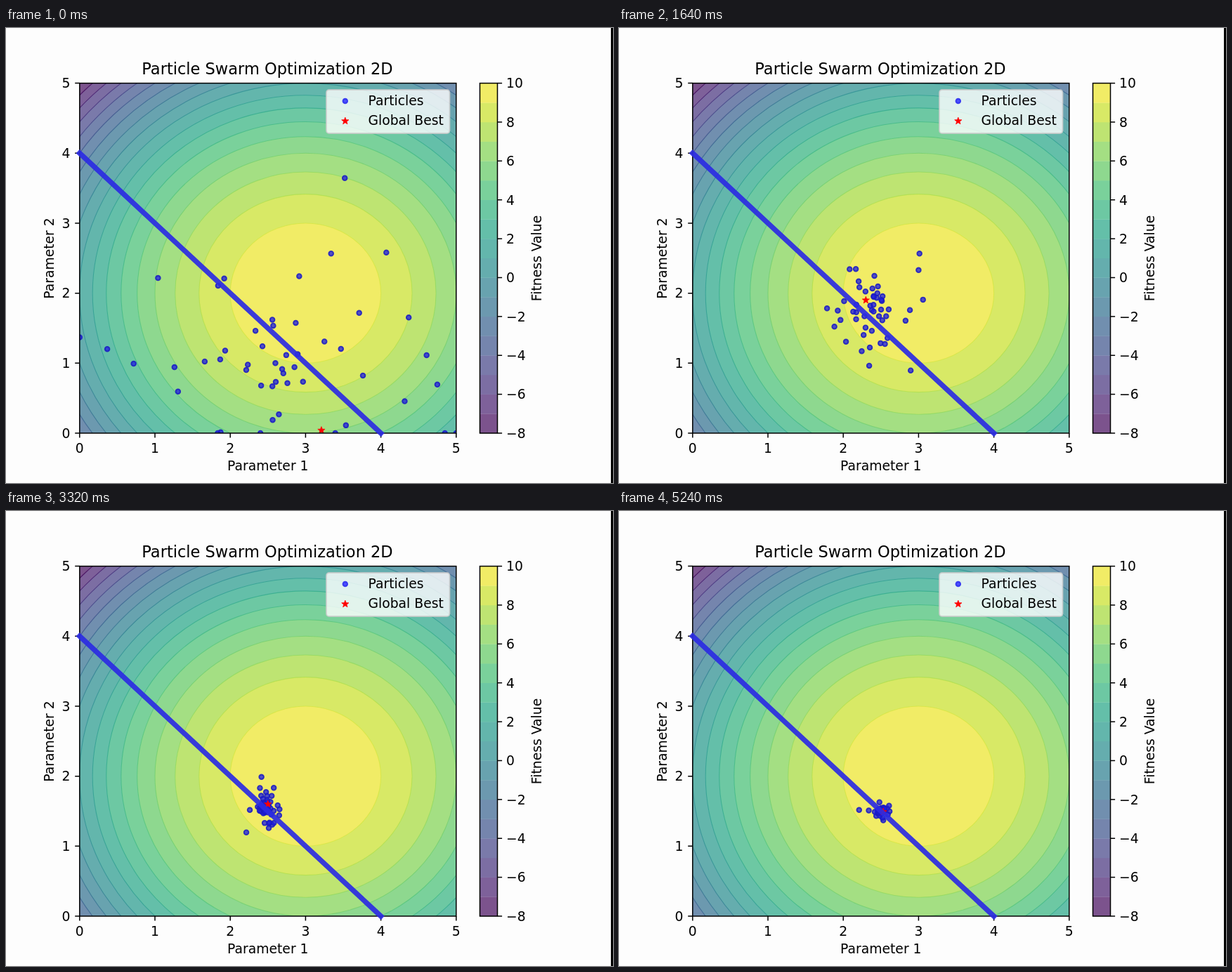
Recreate the animation shown at these times as an HTML page. Size 864 by 648 pixels, loop 5.28 s.

```html
<!DOCTYPE html>
<html lang="en">
<head>
<meta charset="utf-8">
<title>Particle swarm</title>
<style>
html, body { margin: 0; width: 100%; height: 100%; overflow: hidden; background: #fdfdfd; }
svg { display: block; width: 864px; height: 648px; }
text { font: 18.75px "DejaVu Sans", sans-serif; fill: #000; }
.title { font-size: 22.5px; }
.axis { fill: none; stroke: #000; stroke-width: 1.5; }
</style>
</head>
<body>
<svg id="stage" viewBox="0 0 864 648"></svg>
<script>
const LOOP = 5280, STEP = 100, COUNT = 50, BANDS = 18;
const LEFT = 104.8, RIGHT = 640.8, TOP = 78.6, BOTTOM = 577;
const UNIT_X = (RIGHT - LEFT) / 5, UNIT_Y = (BOTTOM - TOP) / 5;
const px = x => LEFT + x * UNIT_X;
const py = y => BOTTOM - y * UNIT_Y;
const stage = document.getElementById('stage');

function add(parent, tag, attrs, label) {
  const el = document.createElementNS('http://www.w3.org/2000/svg', tag);
  for (const key in attrs) el.setAttribute(key, attrs[key]);
  if (label !== undefined) el.textContent = label;
  parent.appendChild(el);
  return el;
}
const rect = (parent, x, y, width, height, attrs) =>
  add(parent, 'rect', { x, y, width, height, ...attrs });
const write = (x, y, label, anchor = 'middle', attrs = {}) =>
  add(stage, 'text', { x, y, 'text-anchor': anchor, ...attrs }, label);
const upright = (x, y, label) =>
  write(0, 0, label, 'middle', { transform: `translate(${x} ${y}) rotate(-90)` });

// Colour map
const MAP = ['440154', '482475', '414487', '355f8d', '2a788e', '21918c',
  '22a884', '44bf70', '7ad151', 'bddf26', 'fde725']
  .map(h => [0, 2, 4].map(i => parseInt(h.slice(i, i + 2), 16)));
function tone(band, alpha) {
  const p = (band + 0.5) / BANDS * 10, i = Math.floor(p);
  const rgb = MAP[i].map((c, k) => c + (MAP[i + 1][k] - c) * (p - i));
  return `rgb(${rgb.map(c => Math.round(c * alpha + 253 * (1 - alpha)))})`;
}

rect(stage, 861, 0, 3, 648, { fill: '#000' });

const clip = add(add(stage, 'defs', {}), 'clipPath', { id: 'plot' });
rect(clip, LEFT, TOP, RIGHT - LEFT, BOTTOM - TOP);
const plot = add(stage, 'g', { 'clip-path': 'url(#plot)' });

// Filled contours of 10 - (x - 3)² - (y - 2)²
rect(plot, LEFT, TOP, RIGHT - LEFT, BOTTOM - TOP, { fill: tone(0, 0.7) });
for (let band = 1; band < BANDS; band++) {
  const r = Math.sqrt(BANDS - band);
  add(plot, 'ellipse', {
    cx: px(3), cy: py(2), rx: r * UNIT_X, ry: r * UNIT_Y, fill: tone(band, 0.7),
    stroke: tone(band - 1, 1), 'stroke-opacity': 0.85 - band * 0.025, 'stroke-width': 1.1
  });
}

// Colour bar
const barStep = (BOTTOM - TOP) / BANDS;
for (let band = 0; band < BANDS; band++) {
  rect(stage, 674.5, BOTTOM - (band + 1) * barStep, 25, barStep + 0.3, { fill: tone(band, 0.7) });
}
rect(stage, 674.5, TOP, 25, BOTTOM - TOP, { class: 'axis' });
for (let v = -8; v <= 10; v += 2) {
  const y = BOTTOM - (v + 8) * barStep;
  add(stage, 'path', { class: 'axis', d: `M699.5 ${y}h6.6` });
  write(712, y + 6.8, String(v).replace('-', '\u2212'), 'start');
}

// Markers
const dot = (parent, x, y, fill, stroke) => add(parent, 'circle', {
  cx: x, cy: y, r: 3.3, fill, stroke, 'fill-opacity': 0.75, 'stroke-opacity': 0.85, 'stroke-width': 1.9
});
const starPoints = Array.from({ length: 10 }, (_, i) => {
  const r = i % 2 ? 2.3 : 5.4, a = i * Math.PI / 5;
  return `${(r * Math.sin(a)).toFixed(2)},${(-r * Math.cos(a)).toFixed(2)}`;
}).join(' ');
const star = parent => add(parent, 'polygon', {
  points: starPoints, fill: '#f00', stroke: '#f00', 'stroke-width': 0.7, 'stroke-linejoin': 'round'
});

const dots = Array.from({ length: COUNT }, () => dot(plot, 0, 0, '#1c1ce0', '#1a1ac4'));
const best = star(plot);

// Axes
rect(stage, LEFT, TOP, RIGHT - LEFT, BOTTOM - TOP, { class: 'axis' });
for (let v = 0; v <= 5; v++) {
  add(stage, 'path', { class: 'axis', d: `M${px(v)} ${BOTTOM}v6.6M${LEFT} ${py(v)}h-6.6` });
  write(px(v), 604.5, v);
  write(91.5, py(v) + 6.8, v, 'end');
}
write(372, 66, 'Particle Swarm Optimization 2D', 'middle', { class: 'title' });
write(372.8, 630.3, 'Parameter 1');
upright(67.5, 328, 'Parameter 2');
upright(761.5, 328, 'Fitness Value');

// Constraint x + y = 4
add(stage, 'path', {
  d: `M${px(0)} ${py(4)}L${px(4)} ${py(0)}`, stroke: '#2c2ce2', 'stroke-opacity': 0.92,
  'stroke-width': 7.3, 'stroke-linecap': 'square'
});

// Legend
rect(stage, 456, 88, 175.5, 62, {
  rx: 4, fill: '#fff', stroke: '#ccc', 'fill-opacity': 0.8, 'stroke-opacity': 0.8, 'stroke-width': 1.8
});
dot(stage, 482.8, 104, '#1818ff', '#2c2cf0');
star(stage).setAttribute('transform', 'translate(482.8 132.5)');
write(515.5, 109.7, 'Particles', 'start');
write(515.5, 138, 'Global Best', 'start');

// Each particle swings about the swarm's centre; a few swing far out
let seed = 11;
const rand = () => (seed = (seed * 16807) % 2147483647) / 2147483647;
const swing = () => {
  const size = 1.3 * Math.pow(-Math.log(1 - rand()), 0.8);
  const phase = rand() * 2 * Math.PI, rate = 0.5 + rand();
  return step => size * Math.cos(phase + rate * step);
};
const particles = dots.map(el => ({ el, dx: swing(), dy: swing() }));

// Step, centre x and y, spread x and y, in plot units
const SWARM = [
  [0, 2.6, 0.95, 0.95, 0.7],
  [9, 2.72, 1.25, 0.42, 0.42],
  [16, 2.38, 1.74, 0.2, 0.36],
  [25, 2.48, 1.58, 0.12, 0.28],
  [33, 2.49, 1.57, 0.09, 0.16],
  [38, 2.49, 1.57, 0.05, 0.11],
  [52, 2.5, 1.5, 0.04, 0.035]
];

// Step, x and y of the best position so far
const BESTS = [[0, 3.21, 0.04], [3, 2.95, 1.05], [8, 2.72, 1.28],
  [12, 2.3, 1.9], [19, 2.5, 1.6], [41, 2.53, 1.49]];

function swarmAt(step) {
  const next = Math.max(1, SWARM.findIndex(row => row[0] >= step));
  const a = SWARM[next - 1], b = SWARM[next];
  const u = (step - a[0]) / (b[0] - a[0]);
  return a.map((v, i) => v + (b[i] - v) * u).slice(1);
}

const clamp = v => Math.min(5, Math.max(0, v));

function draw(time) {
  const step = Math.floor(time / STEP);
  const [cx, cy, sx, sy] = swarmAt(step);
  for (const { el, dx, dy } of particles) {
    el.setAttribute('cx', px(clamp(cx + sx * dx(step))).toFixed(2));
    el.setAttribute('cy', py(clamp(cy + sy * dy(step))).toFixed(2));
  }
  const [, bx, by] = BESTS.filter(row => row[0] <= step).pop();
  best.setAttribute('transform', `translate(${px(bx)} ${py(by)})`);
}

const start = performance.now();
function tick() {
  draw((performance.now() - start) % LOOP);
  requestAnimationFrame(tick);
}
tick();
</script>
</body>
</html>
```
